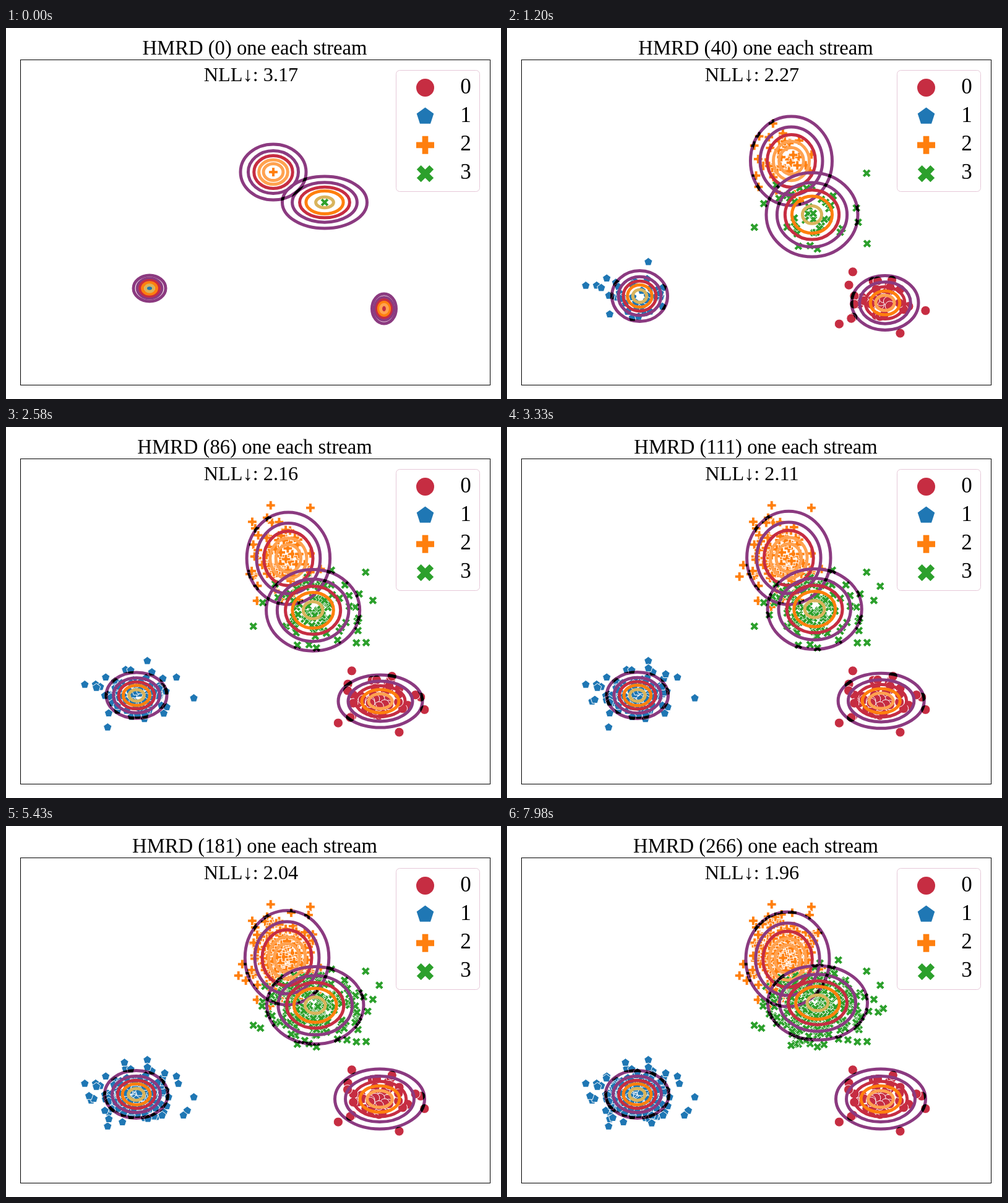
An HTML page with a canvas for the animation above (8 s loop, 800 by 600 pixels).

```html
<!DOCTYPE html>
<html lang="en">
<head>
<meta charset="utf-8">
<style>
html, body { margin: 0; width: 100%; height: 100%; overflow: hidden; background: #fff; }
canvas { display: block; }
</style>
</head>
<body>
<canvas id="stage" width="800" height="600"></canvas>
<script>
const LOOP = 8000, STEP = 30;
const PURPLE = '#8b3a80', RED = '#c62d42', ORANGE = '#ff7f0e', LIGHT = '#ffa250', OLIVE = '#d9b45c';

// Key points: step, then values
const LOSS = [[0, 3.17], [40, 2.27], [86, 2.16], [135, 2.07], [181, 2.04], [217, 2.01], [266, 1.96]];

// fit: step, centre x, centre y, radius x, radius y; cloud: mean and spread of the samples
const clusters = [
  {
    color: RED, size: 7.6, count: 60, cloud: [604, 442, 31, 19], inner: .28,
    rings: [PURPLE, PURPLE, RED, ORANGE, LIGHT],
    fit: [[0, 611, 454, 19.5, 24], [40, 611, 444.5, 54, 44], [86, 605, 443.5, 68, 42.5], [181, 604, 441.5, 72.5, 48.5]]
  },
  {
    color: '#1f77b4', size: 7, count: 210, cloud: [208, 435, 33, 20], inner: .25,
    rings: [PURPLE, PURPLE, RED, ORANGE, OLIVE],
    fit: [[0, 232, 421, 26, 21], [40, 214.5, 433.5, 45, 41], [86, 211, 434, 49, 37], [181, 210.5, 434, 51, 38.5]]
  },
  {
    color: ORANGE, size: 7.4, count: 230, cloud: [446, 212, 28, 34], inner: .3,
    rings: [PURPLE, PURPLE, RED, LIGHT, LIGHT],
    fit: [[0, 432, 233, 53, 45], [40, 459.5, 215, 66, 72], [135, 454.5, 211, 68, 76], [266, 453.5, 215.5, 67.5, 76.5]]
  },
  {
    color: '#2ca02c', size: 7.2, count: 267, cloud: [504, 292, 39, 27], inner: .21,
    rings: [PURPLE, PURPLE, RED, ORANGE, OLIVE],
    fit: [[0, 515, 282, 68.5, 42], [40, 493, 302, 74, 68], [135, 498, 293, 76.5, 64.5], [266, 502, 286, 80.5, 60]]
  }
];

const ctx = document.getElementById('stage').getContext('2d');
const mask = Object.assign(document.createElement('canvas'), { width: 800, height: 600 }).getContext('2d');

function polygon(points) {
  const path = new Path2D();
  points.forEach(([x, y]) => path.lineTo(x, y));
  path.closePath();
  return path;
}
function cross(turn) {
  const t = 1 / 3, points = [];
  for (let i = 0; i < 4; i++) {
    const c = Math.cos(turn + i * Math.PI / 2), s = Math.sin(turn + i * Math.PI / 2);
    for (const [x, y] of [[t, -t], [1, -t], [1, t]]) points.push([x * c - y * s, x * s + y * c]);
  }
  return polygon(points);
}
const disc = new Path2D();
disc.arc(0, 0, 1, 0, 7);
const pentagon = polygon([0, 1, 2, 3, 4].map(i => [Math.sin(i * Math.PI * .4), -Math.cos(i * Math.PI * .4)]));
const shapes = [disc, pentagon, cross(0), cross(Math.PI / 4)];

let seed = 11;
const random = () => (seed = seed * 16807 % 2147483647) / 2147483647;

// One normally distributed sample per step; the first sits at the first fit's centre.
clusters.forEach((c, k) => {
  const [x, y, sx, sy] = c.cloud;
  c.shape = shapes[k];
  c.points = Array.from({ length: c.count }, () => {
    const r = Math.min(Math.sqrt(-2 * Math.log(random())), 2.9), a = 2 * Math.PI * random();
    return [x + sx * r * Math.cos(a), y + sy * r * Math.sin(a)];
  });
  c.points[0] = c.fit[0].slice(1, 3);
});

// Changes slow down as samples accumulate, so progress is logarithmic between key points.
function valuesAt(keys, step) {
  const last = keys[keys.length - 1];
  const k = keys.findIndex(key => key[0] > step);
  if (k < 0) return last.slice(1);
  const a = keys[k - 1], b = keys[k];
  const p = Math.log((step + 2) / (a[0] + 2)) / Math.log((b[0] + 2) / (a[0] + 2));
  return a.slice(1).map((v, i) => v + (b[i + 1] - v) * p);
}

function marker(g, shape, x, y, size, color, edgeMode) {
  g.save();
  g.translate(x, y);
  g.scale(size, size);
  g.fillStyle = color;
  g.fill(shape);
  if (edgeMode) {
    g.globalCompositeOperation = edgeMode;
    g.strokeStyle = '#fff';
    g.lineWidth = 1 / size;
    g.stroke(shape);
  }
  g.restore();
}

function drawPoints(g, c, step, edgeMode) {
  for (const [x, y] of c.points.slice(0, step + 1)) marker(g, c.shape, x, y, c.size, c.color, edgeMode);
}

function ring([x, y, rx, ry], ratio) {
  const path = new Path2D();
  path.ellipse(x, y, rx * ratio, ry * ratio, 0, 0, 2 * Math.PI);
  return path;
}

// Blackens a ring wherever it covers what drawBase paints.
function blacken(path, drawBase) {
  mask.globalCompositeOperation = 'source-over';
  mask.clearRect(0, 0, 800, 600);
  mask.lineWidth = 5;
  mask.strokeStyle = '#000';
  drawBase();
  mask.globalCompositeOperation = 'source-in';
  mask.stroke(path);
  ctx.drawImage(mask.canvas, 0, 0);
}

function text(string, x, y, size) {
  ctx.font = `${size}px "Liberation Serif", serif`;
  ctx.fillStyle = '#000';
  ctx.textAlign = 'center';
  ctx.fillText(string, x, y);
}

function draw(step) {
  ctx.fillStyle = '#fff';
  ctx.fillRect(0, 0, 800, 600);
  clusters.forEach(c => drawPoints(ctx, c, step, 'source-over'));

  const fits = clusters.map(c => valuesAt(c.fit, step));
  const outer = fits.map(fit => ring(fit, 1));
  clusters.forEach((c, i) => {
    ctx.lineWidth = 5;
    [1, .765, .59, .44, c.inner].forEach((ratio, j) => {
      ctx.strokeStyle = c.rings[j];
      ctx.stroke(ring(fits[i], ratio));
    });
    blacken(outer[i], () => drawPoints(mask, c, step, 'destination-out'));
  });
  blacken(outer[3], () => mask.stroke(outer[2]));
  blacken(ring(fits[3], .765), () => mask.stroke(outer[2]));

  ctx.lineWidth = 1;
  ctx.strokeStyle = '#000';
  ctx.strokeRect(23.5, 51.5, 759, 526);
  text(`HMRD (${step}) one each stream`, 402, 43, 32.7);
  text(`NLL↓: ${valuesAt(LOSS, step)[0].toFixed(2)}`, 396, 86, 32.3);

  ctx.beginPath();
  ctx.roundRect(630.5, 68.5, 135, 196, 6);
  ctx.fillStyle = '#fff';
  ctx.fill();
  ctx.strokeStyle = '#e6c8d8';
  ctx.stroke();
  clusters.forEach((c, i) => {
    marker(ctx, c.shape, 677.5, 96.5 + 46.4 * i, 14.5, c.color);
    text(i, 743, 105.5 + 46.2 * i, 35);
  });
}

let shown = -1;
function tick() {
  const step = Math.floor(performance.now() % LOOP / STEP);
  if (step !== shown) draw(shown = step);
  requestAnimationFrame(tick);
}
tick();
</script>
</body>
</html>
```
